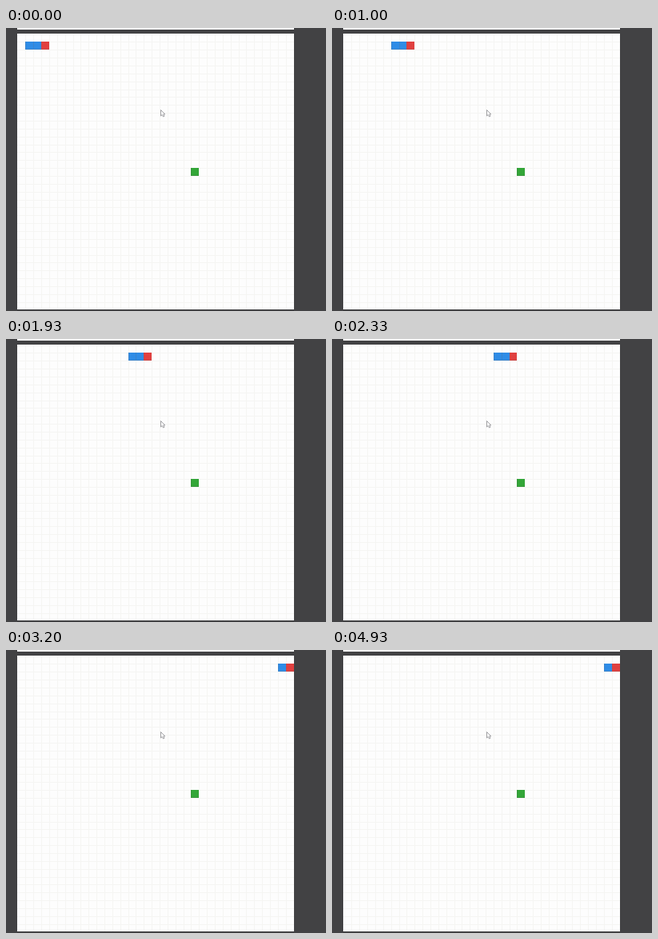
An HTML page with a canvas for the animation above (4.99 s loop, 400x354 px).

```html
<!DOCTYPE html>
<html lang="en">
<head>
<meta charset="utf-8">
<title>Snake</title>
<style>
html, body { margin: 0; width: 100%; height: 100%; overflow: hidden; background: #424244; }
canvas { display: block; }
</style>
</head>
<body>
<canvas width="400" height="354"></canvas>
<script>
const ctx = document.querySelector('canvas').getContext('2d');
const LOOP = 4990, FRAME = 200 / 3;
const LEFT = 14.5, TOP = 7.5, CELLS = 35, CELL = 345 / CELLS;
const WALL = '#424244', PAPER = '#fdfdfd', LINE = '#f5f5f3';

// Head column over time: [ms, column]; the snake speeds up, then hits the wall.
const path = [[0, 3], [470, 4], [1400, 11.5], [1930, 16.5], [2670, 26.5], [3190, 35.2]];

const colX = c => Math.round(LEFT + c * CELL);
const rowY = r => Math.round(TOP + r * CELL);

function rect(x, y, w, h, color) {
  ctx.fillStyle = color;
  ctx.fillRect(x, y, w, h);
}

function cell(c, r, color, edge) {
  const x = colX(c), y = rowY(r), w = colX(c + 1) - x, h = rowY(r + 1) - y;
  rect(x, y, w, h, edge);
  rect(x + 1, y, w - 1, h - 1, color);
}

function headColumn(t) {
  const i = path.findIndex(p => p[0] > t);
  if (i < 0) return CELLS;
  const [t0, c0] = path[i - 1], [t1, c1] = path[i];
  return Math.min(CELLS, Math.floor(c0 + (c1 - c0) * (t - t0) / (t1 - t0)));
}

function drawBoard() {
  rect(0, 0, 400, 354, WALL);
  rect(14, 0, 346, 2, PAPER);
  rect(14, 7, 346, 345, PAPER);
  for (let i = 1; i < CELLS; i++) {
    rect(colX(i), 7, 1, 345, LINE);
    rect(14, rowY(i), 346, 1, LINE);
  }
}

function drawPointer() {
  ctx.fillStyle = PAPER;
  ctx.strokeStyle = '#8c8c90';
  ctx.lineWidth = 0.8;
  const arrow = new Path2D('M193.5 102.5v7.5l1.7-1.5 1.3 2.5 1.4-.7-1.2-2.4h2.1z');
  ctx.fill(arrow);
  ctx.stroke(arrow);
}

function draw(now) {
  // The small offset keeps rounded frame times from falling back a step.
  const t = Math.floor((now % LOOP + 4) / FRAME) * FRAME;
  const head = headColumn(t);
  drawBoard();
  cell(22, 17, '#33a638', '#39963d');
  for (const back of [2, 1]) cell(head - back, 1, '#2f8ce6', '#3a84cc');
  cell(Math.min(head, CELLS - 1), 1, '#e04040', '#cc4646');
  drawPointer();
  requestAnimationFrame(draw);
}
draw(performance.now());
</script>
</body>
</html>
```
